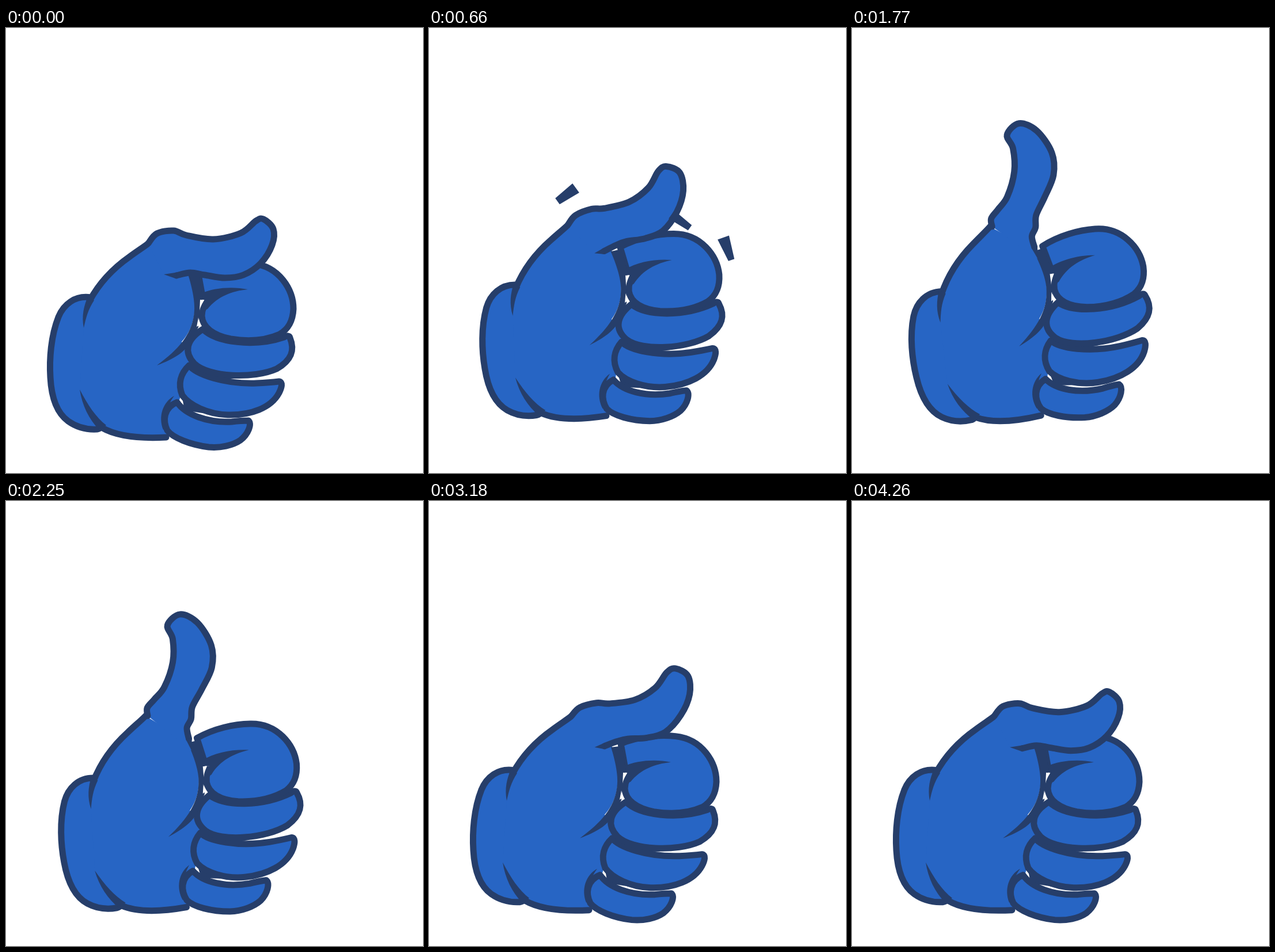
Write an HTML page with a canvas that moves like this. It is 724 px wide and 773 px high and loops after 4290 ms.

```html
<!DOCTYPE html>
<html lang="en">
<head>
<meta charset="utf-8">
<title>Thumbs up</title>
<style>
html, body { margin: 0; width: 100%; height: 100%; overflow: hidden; background: #fff; }
canvas { display: block; }
</style>
</head>
<body>
<canvas id="stage" width="724" height="773"></canvas>
<script>
const ctx = document.getElementById('stage').getContext('2d');
const BLUE = '#2765c4', NAVY = '#263e6a';
const STEP = 30, FRAMES = 143, LINE = 11;
const TILT = 11 * Math.PI / 180;

const lerp = (a, b, u) => a + (b - a) * u;
const smooth = u => u * u * (3 - 2 * u);
const swing = u => (1 - Math.cos(Math.PI * u)) / 2;
const easeOut = u => 1 - (1 - u) * (1 - u);

// keys: [frame, value, easing into this key]
function track(keys, f) {
  if (f <= keys[0][0]) return keys[0][1];
  for (let i = 1; i < keys.length; i++) {
    const [f0, v0] = keys[i - 1], [f1, v1, ease] = keys[i];
    if (f <= f1) return lerp(v0, v1, ease((f - f0) / (f1 - f0)));
  }
  return keys[keys.length - 1][1];
}

const BOB = [0, 16.5, 35, 53, 71.5, 89, 107, 125, 143].map((f, i) => [f, i % 2 * 46, swing]);
const TURN = [[18, 0], [30, 1, easeOut], [57, 1, smooth], [70, 0, smooth],
  [82, 1, easeOut], [83, 1, smooth], [96, 0, smooth]];
const LIFT = [[18, 0], [30.5, 1, smooth], [97.5, 1, smooth], [110, 0, smooth]];

const path = d => new Path2D(d);
const cuff = path('M147 468 C120 464 100 480 91 502 C78 535 75 575 77 607 C79 645 90 670 108 683 C122 693 140 698 158 697 C164 696 166 693 165 690');
const palm = path('M135 520 C134 490 150 463 165 443 C185 418 205 403 250 373 L318 427 C333 470 333 515 305 545 L322 585 L303 640 L282 709 C250 714 200 712 168 694 L128 630 Z');
const palmLines = path('M145 474 C165 437 195 411 215 397 C230 386 240 380 250 372 M166 694 C195 711 240 713 278 711');
const creases = path('M135 521 C131 500 135 482 143 465 L153 473 C142 490 139 503 135 521 Z M128 628 C132 655 144 680 162 698 L174 690 C156 676 142 655 128 628 Z');
const palmEdge = path('M316 428 C323 450 330 480 326 500 C321 533 300 558 262 586 C292 575 310 563 318 548 L334 520 C336 500 337 470 342 470 L334 426 Z');
const backing = path('M337 520 L420 545 L470 540 L420 600 L400 609 L340 610 L372 674 L310 664 L300 610 L322 575 Z');
const pinky = path('M297 650 C312 672 350 686 392 684 C408 682 414 682 421 682 C427 688 421 705 407 716 C394 725 372 730 352 728 C320 724 290 712 280 699 C272 682 273 660 297 650 Z');
const pinkyCrease = path('M292 639 C272 650 264 675 273 698 L284 690 C277 670 280 655 292 639 Z');
const ring = path('M318 586 C330 602 380 619 435 617 C455 616 465 615 474 614 C481 615 479 624 474 634 C460 660 425 673 385 672 C350 671 318 655 306 638 C298 618 303 600 318 586 Z');
const middle = path('M342 523 C365 546 430 555 483 537 C488 534 492 534 493 538 C502 560 496 577 470 592 C430 610 352 607 327 583 C308 563 313 541 342 523 Z');
const index = path('M333 422 C365 409 400 406 428 409 C475 414 499 455 499 488 C498 510 490 523 475 532 C450 543 420 545 390 540 C360 534 341 520 340 500 C340 487 346 477 355 468 L341 466 Z');
const indexCrease = path('M336 462 C362 450 395 449 420 454 C392 457 368 466 350 488 L341 492 L349 472 L338 472 Z');
const gaps = path('M337 472 L344 473 C339 481 336 488 336 493 Z M334 503 C335 509 336 513 338 515 L331 519 Z');

// thumb outlines as x, y pairs running over the tip from back to front
const HINGE = [275, 360];
const THUMB = [
  { at: 0, turn: 0, pts: [247,374, 262,357, 291,352, 313,360, 360,367, 408,356, 434,335, 447,332,
    464,349, 462,377, 442,409, 412,429, 380,434, 345,429, 320,425, 296,430, 274,428] },
  { at: .25, turn: -.255, pts: [247,374, 262,359, 291,351, 313,352, 357,345, 392,324, 412,297, 427,290,
    449,303, 452,335, 437,371, 410,401, 378,411, 345,413, 326,418, 305,426, 288,428] },
  { at: 1, turn: -1.03, pts: [253,373, 254,359, 268,346, 288,327, 308,286, 313,246, 307,221, 331,205,
    359,223, 378,265, 374,304, 352,339, 332,367, 327,388, 318,402, 319,421, 321,442] }
];

function rotate([x, y], a) {
  const c = Math.cos(a), s = Math.sin(a);
  return [x * c - y * s, x * s + y * c];
}

function thumbPoints(lift) {
  const k = lift < THUMB[1].at ? 0 : 1;
  const a = THUMB[k], b = THUMB[k + 1];
  const u = (lift - a.at) / (b.at - a.at);
  const turn = lerp(a.turn, b.turn, u);
  const flat = (pose, i) => rotate([pose.pts[i] - HINGE[0], pose.pts[i + 1] - HINGE[1]], -pose.turn);
  const out = [];
  for (let i = 0; i < a.pts.length; i += 2) {
    const p = flat(a, i), q = flat(b, i);
    const [x, y] = rotate([lerp(p[0], q[0], u), lerp(p[1], q[1], u)], turn);
    out.push([x + HINGE[0], y + HINGE[1]]);
  }
  return out;
}

function curve(pts) {
  const p = new Path2D();
  p.moveTo(...pts[0]);
  for (let i = 0; i < pts.length - 1; i++) {
    const a = pts[Math.max(i - 1, 0)], b = pts[i], c = pts[i + 1];
    const d = pts[Math.min(i + 2, pts.length - 1)];
    p.bezierCurveTo(b[0] + (c[0] - a[0]) / 6, b[1] + (c[1] - a[1]) / 6,
      c[0] - (d[0] - b[0]) / 6, c[1] - (d[1] - b[1]) / 6, ...c);
  }
  return p;
}

function fill(p, color) {
  ctx.fillStyle = color;
  ctx.fill(p);
}

function inked(p) {
  fill(p, BLUE);
  ctx.stroke(p);
}

function drawThumb(lift) {
  const pts = thumbPoints(lift);
  fill(curve(pts), BLUE);
  ctx.stroke(curve(pts.slice(0, -1)));
  const [tip, end] = [pts[16], pts[15]];
  const dx = tip[0] - end[0], dy = tip[1] - end[1], k = LINE / 2 / Math.hypot(dx, dy);
  const taper = new Path2D();
  taper.moveTo(end[0] - dy * k, end[1] + dx * k);
  taper.lineTo(...tip);
  taper.lineTo(end[0] + dy * k, end[1] - dx * k);
  fill(taper, NAVY);
}

function drawHand(f) {
  ctx.save();
  ctx.translate(287, 431 - track(BOB, f));
  ctx.rotate(-TILT * track(TURN, f));
  ctx.translate(-287, -431);
  ctx.strokeStyle = NAVY;
  ctx.lineWidth = LINE;
  ctx.lineCap = ctx.lineJoin = 'round';

  inked(cuff);
  fill(palm, BLUE);
  ctx.stroke(palmLines);
  fill(creases, NAVY);
  fill(backing, NAVY);
  fill(pinky, BLUE);
  fill(pinkyCrease, NAVY);
  [pinky, ring, middle, index].forEach(inked);
  fill(indexCrease, NAVY);
  fill(palmEdge, NAVY);
  fill(gaps, '#fff');
  drawThumb(track(LIFT, f));
  ctx.restore();
}

// wide end, direction to the narrow end, both widths, speed
const SPARKS = [
  { x: 255, y: 278, dx: -32, dy: 23, wide: 20, thin: 13, speed: .5 },
  { x: 421, y: 324, dx: 32, dy: 23, wide: 17, thin: 11, speed: .95 },
  { x: 511, y: 364, dx: 14, dy: 39, wide: 21, thin: 11, speed: .7 }
];

function drawSparks(f) {
  if (f < 20 || f > 29) return;
  const size = Math.min(1, (30 - f) / 5);
  ctx.fillStyle = NAVY;
  for (const s of SPARKS) {
    const go = s.speed * (f - 22);
    const len = Math.hypot(s.dx, s.dy);
    ctx.save();
    ctx.translate(s.x + s.dx * (go + 1), s.y + s.dy * (go + 1));
    ctx.rotate(Math.atan2(s.dy, s.dx));
    ctx.scale(size, size);
    ctx.beginPath();
    ctx.moveTo(-len, -s.wide / 2);
    ctx.lineTo(0, -s.thin / 2);
    ctx.lineTo(0, s.thin / 2);
    ctx.lineTo(-len, s.wide / 2);
    ctx.fill();
    ctx.restore();
  }
}

let start = null;
function draw(now) {
  if (start === null) start = now;
  const f = Math.floor((now - start) / STEP) % FRAMES;
  ctx.fillStyle = '#fff';
  ctx.fillRect(0, 0, 724, 773);
  drawHand(f);
  drawSparks(f);
  requestAnimationFrame(draw);
}
requestAnimationFrame(draw);
</script>
</body>
</html>
```
